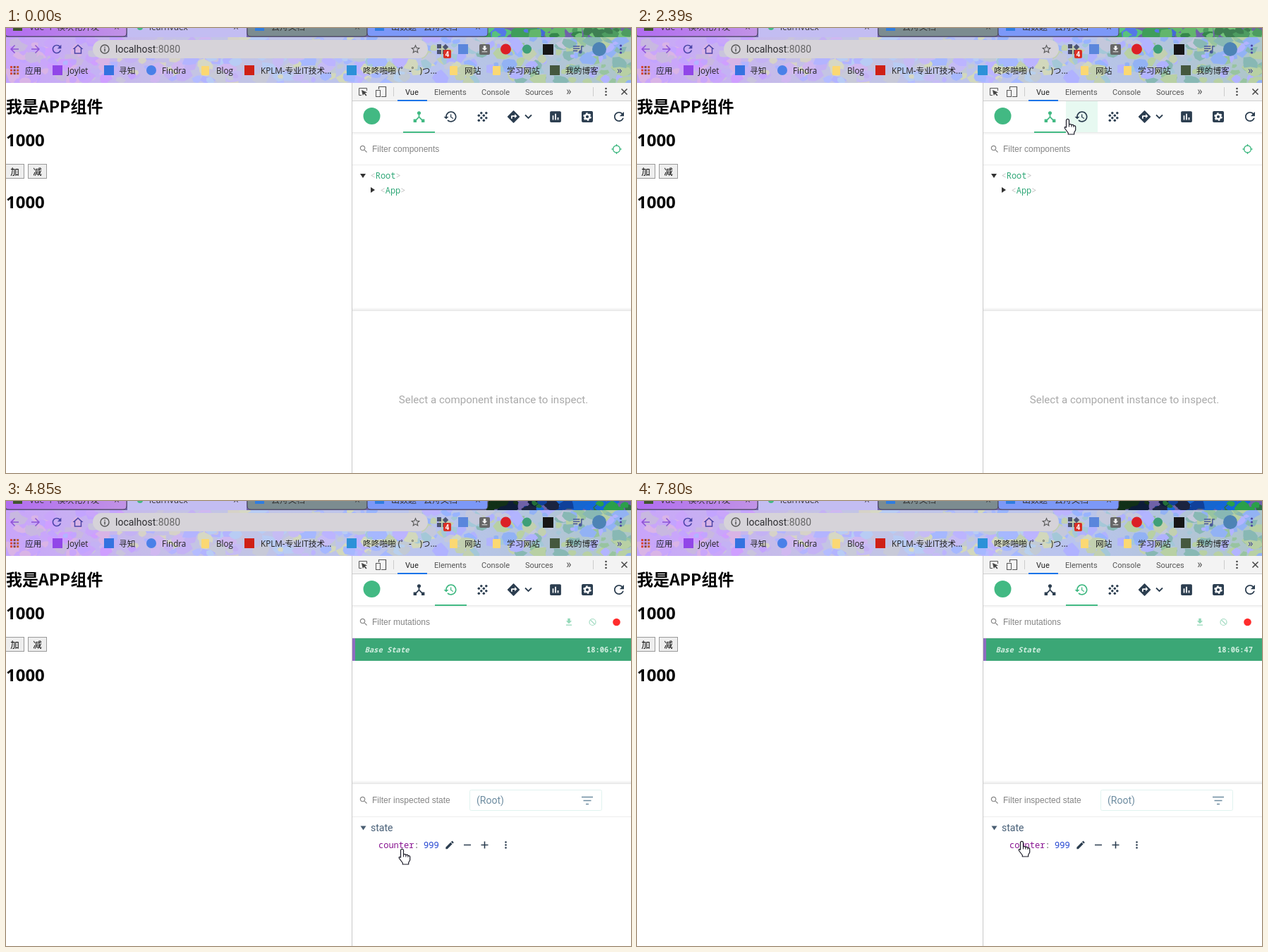
These frames come from a looping animation (886 px wide and 632 px high, 8 s). An HTML page:

```html
<!DOCTYPE html>
<html lang="zh">
<head>
<meta charset="utf-8">
<title>Devtools</title>
<style>
html, body { margin: 0; width: 100%; height: 100%; overflow: hidden; background: #fff; }
svg { display: block; }
text { white-space: pre; }
</style>
</head>
<body>
<svg id="stage" width="886" height="632" viewBox="0 0 886 632"></svg>
<script>
const ROBOTO = 'Roboto, sans-serif', ARIAL = 'Liberation Sans, sans-serif';
const MONO = 'Noto Sans Mono, monospace', UI = 'Open Sans, Noto Sans CJK SC, Noto Sans CJK, sans-serif';
const CJK = 'Noto Sans CJK SC, Noto Sans CJK, sans-serif';
const DARK = '#2c3e50', GREEN = '#42b983';

const text = (x, y, s, size, fill, font, extra = '') =>
  `<text x="${x}" y="${y}" font-size="${size}" fill="${fill}" font-family="${font}" ${extra}>${s}</text>`;
const rect = (x, y, w, h, fill, extra = '') =>
  `<rect x="${x}" y="${y}" width="${w}" height="${h}" fill="${fill}" ${extra}/>`;
const dot = (x, y, r, fill, extra = '') => `<circle cx="${x}" cy="${y}" r="${r}" fill="${fill}" ${extra}/>`;
const shape = (d, fill, extra = '') => `<path d="${d}" fill="${fill}" ${extra}/>`;
const line = (d, color, width = 1) => shape(d, 'none', `stroke="${color}" stroke-width="${width}"`);
const icon = (cx, cy, size, d, fill = DARK, extra = '') =>
  shape(d, fill, `fill-rule="evenodd" transform="translate(${cx - size / 2} ${cy - size / 2}) scale(${size / 24})" ${extra}`);
const dots = (x, y, gap, r, fill) => [-1, 0, 1].map(i => dot(x, y + i * gap, r, fill)).join('');
const group = (id, content) => `<g id="${id}">${content}</g>`;

const ICON = {
  back: 'M20 11H7.83l5.59-5.59L12 4l-8 8 8 8 1.41-1.41L7.83 13H20v-2z',
  forward: 'M4 11h12.17l-5.59-5.59L12 4l8 8-8 8-1.41-1.41L16.17 13H4v-2z',
  refresh: 'M17.65 6.35C16.2 4.9 14.21 4 12 4c-4.42 0-8 3.58-8 8s3.58 8 8 8c3.73 0 6.84-2.55 7.73-6h-2.08c-.82 2.33-3.04 4-5.65 4-3.31 0-6-2.69-6-6s2.69-6 6-6c1.66 0 3.14.69 4.22 1.78L13 11h7V4l-2.35 2.35z',
  home: 'M12 3L2 12h3v9h14v-9h3zM12 5.7l5 4.5V19H7v-8.8z',
  star: 'M22 9.24l-7.19-.62L12 2 9.19 8.63 2 9.24l5.46 4.73L5.82 21 12 17.27 18.18 21l-1.63-7.03zM12 15.4l-3.76 2.27 1-4.28-3.32-2.88 4.38-.38L12 6.1l1.71 4.04 4.38.38-3.32 2.88 1 4.28z',
  queue: 'M15 6H3v2h12V6zm0 4H3v2h12v-2zM3 16h8v-2H3v2zM17 6v8.18c-.31-.11-.65-.18-1-.18-1.66 0-3 1.34-3 3s1.34 3 3 3 3-1.34 3-3V8h3V6h-5z',
  tree: 'M17 16l-4-4V8.82C14.16 8.4 15 7.3 15 6c0-1.66-1.34-3-3-3S9 4.34 9 6c0 1.3.84 2.4 2 2.82V12l-4 4H3v5h5v-3.05l4-4.2 4 4.2V21h5v-5h-4z',
  history: 'M13 3c-4.97 0-9 4.03-9 9H1l3.89 3.89.07.14L9 12H6c0-3.87 3.13-7 7-7s7 3.13 7 7-3.13 7-7 7c-1.93 0-3.68-.79-4.94-2.06l-1.42 1.42C8.27 19.99 10.51 21 13 21c4.97 0 9-4.03 9-9s-4.03-9-9-9zm-1 5v5l4.28 2.54.72-1.21-3.5-2.08V8H12z',
  route: 'M21.71 11.29l-9-9c-.39-.39-1.02-.39-1.41 0l-9 9c-.39.39-.39 1.02 0 1.41l9 9c.39.39 1.02.39 1.41 0l9-9c.39-.38.39-1.01 0-1.41zM14 14.5V12h-4v3H8v-4c0-.55.45-1 1-1h5V7.5l3.5 3.5-3.5 3.5z',
  chart: 'M19 3H5c-1.1 0-2 .9-2 2v14c0 1.1.9 2 2 2h14c1.1 0 2-.9 2-2V5c0-1.1-.9-2-2-2zM9 17H7v-7h2v7zm4 0h-2V7h2v10zm4 0h-2v-4h2v4z',
  search: 'M15.5 14h-.79l-.28-.27C15.41 12.59 16 11.11 16 9.5 16 5.91 13.09 3 9.5 3S3 5.91 3 9.5 5.91 16 9.5 16c1.61 0 3.09-.59 4.23-1.57l.27.28v.79l5 4.99L20.49 19l-4.99-5zm-6 0C7.01 14 5 11.99 5 9.5S7.01 5 9.5 5 14 7.01 14 9.5 11.99 14 9.5 14z',
  download: 'M19 9h-4V3H9v6H5l7 7 7-7zM5 18v2h14v-2H5z',
  edit: 'M3 17.25V21h3.75L17.81 9.94l-3.75-3.75L3 17.25zM20.71 7.04c.39-.39.39-1.02 0-1.41l-2.34-2.34c-.39-.39-1.02-.39-1.41 0l-1.83 1.83 3.75 3.75 1.83-1.83z'
};

let seed = 11;
const rnd = () => (seed = seed * 16807 % 2147483647) / 2147483647;

// Soft camouflage: random blobs whose palette follows x.
function camo(x0, x1, y0, y1, count, size, palettes) {
  let out = '';
  for (let i = 0; i < count; i++) {
    const x = x0 + rnd() * (x1 - x0), y = y0 + rnd() * (y1 - y0);
    const zone = Math.min(palettes.length - 1, Math.floor(((x - x0) / (x1 - x0) + (rnd() - .5) * .2) * palettes.length));
    const colors = palettes[Math.max(0, zone)].split(' ');
    const r = size * (.4 + rnd());
    const pts = Array.from({ length: 8 }, (_, k) => {
      const d = r * (.55 + rnd() * .6), a = k * Math.PI / 4;
      return (x + d * 1.3 * Math.cos(a)).toFixed(1) + ',' + (y + d * Math.sin(a)).toFixed(1);
    });
    out += `<polygon points="${pts.join(' ')}" fill="${colors[Math.floor(rnd() * colors.length)]}"/>`;
  }
  return out;
}

function tab(x, w, fill, mark, title) {
  return shape(`M${x} -2V7q0 5 5 5H${x + w - 5}q5 0 5-5V-2z`, fill, 'stroke="#4a4658"') +
    rect(x + 11, -8, 13, 12, mark) + text(x + 34, 3, title, 12, '#333', UI) +
    text(x + w - 18, 4, '×', 14, '#444', UI);
}

function browser() {
  let s = `<clipPath id="strip"><rect width="886" height="13"/></clipPath>
    <clipPath id="bar"><rect y="13" width="886" height="65"/></clipPath>
    <linearGradient id="tint"><stop stop-color="#c9a4fa"/><stop offset=".3" stop-color="#c4c4e4"/>
    <stop offset=".7" stop-color="#b9c4ee"/><stop offset="1" stop-color="#adc6c8"/></linearGradient>
    <linearGradient id="violet"><stop stop-color="#b16cf0"/><stop offset="1" stop-color="#c193e6"/></linearGradient>`;
  s += '<g clip-path="url(#strip)">' + rect(0, 0, 886, 13, '#6f62a8') +
    group('skyA', camo(680, 886, 0, 12, 45, 8, ['#3f9e5a #5577e8 #59c27c', '#4468d8 #62b66c #35864c', '#4d9c60 #3e7f52 #72c27a'])) +
    group('skyB', camo(680, 886, 0, 12, 45, 8, ['#123018 #0d1c38 #236e38', '#1666d0 #10409a #1b2440', '#2ba04a #1566d8 #2b7244'])) +
    tab(-1, 172, 'url(#violet)', '#40552f', 'Vue 个 模块化开发') +
    rect(172, 0, 169, 13, '#c3bdf2') + dot(190, -1, 4, GREEN) + text(203, 3, 'learnvuex', 12, '#333', UI) +
    text(322, 4, '×', 14, '#444', UI) +
    tab(342, 170, '#7c8c90', '#2f7de0', '云舟文档') +
    tab(512, 171, '#7c98f8', '#2f7de0', '出数题 - 云舟文档') + '</g>';
  s += '<g clip-path="url(#bar)">' + rect(0, 13, 886, 65, 'url(#tint)') +
    camo(0, 886, 13, 78, 420, 8, [
      '#cf9fff #c9a6fa #d9b4e6 #c3a4ff #c8b8e0', '#c4b2f4 #b3b4ff #d6d2c8 #c9c4dc #d0b8f0',
      '#b4bcff #d6d8c4 #c8cad8 #b8ccf4 #c6bcf4', '#a6b8ff #d2d8bc #c2cad4 #b8d0ee #bcb4ff',
      '#98b4ff #c2d0b0 #b0b2ff #a4c8d8 #c4c8dc', '#92b2f4 #98c4a0 #b2b4ff #b8d0a4 #88b8b4']) + '</g>';

  s += rect(123, 17, 475, 26, '#d6d3d9', 'rx="13"');
  s += icon(12, 30, 18, ICON.back, '#8d55d4') + icon(42, 30, 18, ICON.forward, '#8d55d4') +
    icon(72, 30, 19, ICON.refresh, '#4a45a8') + icon(102, 30, 18, ICON.home, '#4a45a8');
  s += dot(140, 30, 6, 'none', 'stroke="#555" stroke-width="1.4"') + rect(139.3, 29, 1.5, 4.5, '#555') + rect(139.3, 26.5, 1.5, 1.5, '#555');
  s += text(155, 35, 'localhost<tspan fill="#666">:8080</tspan>', 14, '#2f2f33', ROBOTO) + icon(580.5, 30, 16, ICON.star, '#555');

  s += [[611, 23], [611, 31], [619, 31]].map(p => rect(...p, 6, 6, '#4d5570')).join('') +
    rect(620, 24, 6, 6, '#4d5570', 'transform="rotate(45 623 27)"') +
    rect(620, 31, 11, 12, '#d93025', 'rx="2"') + text(622.5, 41, '4', 10, '#fff', ROBOTO, 'font-weight="bold"');
  s += rect(641, 23, 14, 14, '#5a86dc') + rect(671, 23, 15, 15, '#666', 'rx="2"') + icon(678.5, 30, 13, ICON.download, '#eee') +
    dot(708.5, 30, 7.5, '#dc1f25') + dot(738.5, 30, 6.5, '#3f9f78') + rect(761, 23, 15, 15, '#161616') +
    icon(811, 30, 19, ICON.queue, '#4a5a9a') + dot(841, 30, 10, '#4d83b5') + dots(871.5, 30, 5, 1.6, '#4a45a0');

  for (let i = 0; i < 9; i++) s += rect(6 + i % 3 * 4.6, 54 + Math.floor(i / 3) * 4.6, 3, 3, ['#d9453a', '#8a4a3a', '#c05a2c'][i % 3]);
  const marks = [[66, '#9146e8'], [139, '#3472e0'], [338, '#cf2016'], [483, '#2b91d8'], [771, '#45583e']];
  s += marks.map(([x, c]) => rect(x, 53, 14, 14, c)).join('') + dot(206, 60, 7, '#4a80e8');
  s += [277, 629, 690].map(x => rect(x, 54, 11, 13, '#fbd873', 'rx="1"')).join('');
  const labels = [[27, '应用'], [87, 'Joylet'], [160, '寻知'], [221, 'Findra'], [298, 'Blog'], [361, 'KPLM-专业IT技术...'],
    [506, '咚咚啪啪 (゜-゜)つ...'], [650, '网站'], [710, '学习网站'], [793, '我的博客']];
  s += labels.map(([x, l]) => text(x, 65, l, 11.7, '#222', UI)).join('') + text(866, 65, '»', 15, '#3f3f90', UI);
  return s;
}

function page() {
  const button = (x, w, label) => rect(x + .5, 193.5, w, 20, '#eee', 'stroke="#999"') + text(x + w / 2 + .5, 208.5, label, 12.5, '#000', CJK, 'text-anchor="middle"');
  const total = y => text(0, y, '1000', 24, '#000', 'Open Sans, sans-serif', 'font-weight="bold"');
  return rect(0, 78, 490, 554, '#fff') + text(0, 120, '我是APP组件', 23, '#000', CJK, 'font-weight="bold"') +
    total(168) + total(256) + button(-1, 26, '加') + button(31, 26, '减');
}

function panel() {
  let s = rect(490, 78, 396, 554, '#fff') + rect(490, 78, 1, 554, '#c8c8c8') + rect(491, 78, 395, 25, '#f3f3f3') + rect(491, 103, 395, 1, '#d0d0d0');
  s += line('M504 95.5H500.5V85.5H511.5V89', '#555') + shape('M504 88l8 3.5-3.2 1 2.7 3-1.3 1-2.6-3-1.8 2.5z', '#444') +
    line('M528.5 87V83.5H538.5V97.5H532', '#555', 1.2) + rect(524.5, 88.5, 6, 9, '#f3f3f3', 'stroke="#555"') +
    rect(549, 84, 1, 13, '#ccc') + rect(832, 84, 1, 13, '#ccc');
  s += [[566, 'Vue', '#222'], [607, 'Elements', '#555'], [674, 'Console', '#555'], [736, 'Sources', '#555']]
    .map(([x, l, c]) => text(x, 95, l, 11, c, ROBOTO)).join('') + text(794, 95, '»', 16, '#555', ROBOTO);
  s += rect(555, 102, 42, 2, '#1a73e8') + dots(850.5, 90.5, 4.5, 1.3, '#444') + line('M872.5 86.5l8 8m0-8l-8 8', '#444', 1.5);

  s += rect(491, 148, 395, 1, '#e9e9e9') + rect(491, 149, 395, 2, '#f6f6f6') + dot(518.5, 125, 12, GREEN);
  s += `<rect id="hover" y="104" width="45" height="44" fill="#e7f9f1"/><rect id="underline" y="147" width="45" height="2" fill="${GREEN}"/>`;
  s += icon(585.5, 126, 21, ICON.tree, DARK, 'id="tab0"') + icon(630, 126, 20.5, ICON.history, DARK, 'id="tab1"');
  for (let i = 0; i < 16; i++) if ((i + (i >> 2)) % 2) s += dot(670.3 + i % 4 * 3.5, 120.8 + (i >> 2) * 3.5, 1.75, DARK);
  s += icon(719.5, 126, 21, ICON.route) + line('M736 123.5l4.5 4.5 4.5-4.5', DARK, 1.8) + icon(779, 126, 21, ICON.chart) +
    rect(816, 118, 16, 16, DARK, 'rx="2"') + dot(824, 126, 3.3, 'none', 'stroke="#fff" stroke-width="2.4"') +
    dot(824, 126, 5, 'none', 'stroke="#fff" stroke-width="1.6" stroke-dasharray="2.6 2.636"') + icon(869, 126, 21, ICON.refresh);
  s += icon(507, 172, 14, ICON.search, '#888') + rect(491, 194, 395, 1, '#ececec');
  s += `<linearGradient id="shade" x2="0" y2="1"><stop stop-color="#fff"/><stop offset="1" stop-color="#e6e6e6"/></linearGradient>`;
  return s + rect(491, 397, 395, 5, 'url(#shade)');
}

function components() {
  const tag = (x, y, name) => text(x, y, `&lt;<tspan fill="#2fa777">${name}</tspan>&gt;`, 12, '#c4c4c4', MONO);
  return text(519, 176, 'Filter components', 12, '#858585', ARIAL) +
    dot(865.5, 172, 5, 'none', `stroke="${GREEN}" stroke-width="1.3"`) +
    line('M865.5 165v3m0 8v3M858.5 172h3m8 0h3', GREEN, 1.3) +
    shape('M502 207h8l-4 6z', '#333') + tag(516.5, 214, 'Root') + shape('M517 226v8l6-4z', '#333') + tag(530.5, 235, 'App') +
    text(691, 533, 'Select a component instance to inspect.', 15.1, '#a9a9a9', ROBOTO, 'text-anchor="middle"');
}

function store() {
  const bold = 'font-weight="bold"';
  return text(519, 176, 'Filter mutations', 12, '#858585', ARIAL) + icon(798, 172, 14, ICON.download, '#93d8b8') +
    dot(831.5, 172, 4.5, 'none', 'stroke="#a5dcc3" stroke-width="1.2"') + line('M828.5 169l6 6', '#a5dcc3', 1.2) + dot(865.5, 172, 5.3, '#ff2c2c') +
    rect(491, 195, 395, 32, '#3ba776') + rect(491, 195, 4, 32, '#8e6cc0') +
    text(508.5, 215, 'Base State', 10.5, '#d3efe1', MONO, bold + ' font-style="italic"') +
    icon(593, 211, 14, ICON.history, '#d3efe1', 'id="travel"') + text(823, 215, '18:06:47', 10.4, '#d3efe1', MONO, bold) +
    icon(507, 425, 14, ICON.search, '#888') + text(519, 429, 'Filter inspected state', 12, '#858585', ARIAL) +
    rect(657.5, 410.5, 187, 29, '#fff', 'stroke="#e0f3ef" rx="2"') + text(667, 430, '(Root)', 14, '#6d8ca0', ROBOTO) +
    line('M816 420.5h16M818.5 425.5h11M822 430.5h4', '#6d8ca0', 1.6) + rect(491, 448, 395, 1, '#ececec') +
    shape('M502.5 461.5h8l-4 6z', '#4a5e72') + text(517, 469, 'state', 14, '#486078', ROBOTO) +
    text(528, 493, 'counter<tspan fill="#666">:</tspan>', 12, '#881391', MONO) + text(592, 493, '999', 12, '#1c3fcf', MONO) +
    group('tools', icon(629, 488.5, 15, ICON.edit) + line('M649 488.5h10M673.5 488.5h10M678.5 483.5v10', DARK, 1.6) + dots(708.5, 488.5, 4, 1.3, DARK));
}

const hand = shape('M-2.5 2.3a2 2 0 0 1 4 0V8q2.7-1.2 3.4.7 2.3-1 3 .9 2.8-.3 2.8 2V16l-2 3.5V22H.3V20L-4.6 13.5q-1-3 2.1-1.3z', '#fff', 'stroke="#1b1b28" stroke-width="1.2" stroke-linejoin="round"') +
  line('M1.5 8v3.5M4.9 8.7v3M7.9 9.6v2.4', '#1b1b28');
const arrow = shape('M.5.5v16l3.7-3.5 2.4 5.5 2.4-1-2.4-5.5h5z', '#fff', 'stroke="#000"');

const $ = id => document.getElementById(id);
$('stage').innerHTML = browser() + page() + panel() + group('components', components()) + group('store', store()) +
  group('cursor', group('hand', hand) + group('arrow', arrow));

// Pointer moves: start, end, number of steps, path.
const moves = [
  [210, 980, 11, [[91, 548], [310, 470], [540, 340], [656, 230], [610, 165], [534, 141]]],
  [1060, 1060, 1, [[602, 138]]],
  [1210, 1910, 10, [[606, 138], [618, 129], [622, 126], [613, 128], [608, 130]]],
  [2390, 2390, 1, [[611, 129]]],
  [2770, 3080, 5, [[611, 129], [612, 131]]],
  [3610, 3850, 4, [[610, 140], [582, 176], [545, 227]]],
  [3930, 4390, 7, [[540, 260], [548, 350], [575, 481]]],
  [4620, 4850, 4, [[573, 485], [562, 494]]],
  [5100, 5480, 6, [[557, 494], [535, 490], [509, 480]]],
  [5710, 6100, 6, [[503, 470], [497, 458], [518, 472], [537, 491]]],
  [7490, 7490, 1, [[538, 491]]],
  [7640, 7800, 3, [[540, 488], [546, 483]]]
];

function pointer(t) {
  const move = moves.filter(m => t >= m[0]).pop();
  if (!move) return null;
  const [start, end, steps, path] = move;
  if (steps == 1) return path[0];
  const step = Math.min(steps - 1, Math.floor((t - start) / (end - start) * (steps - 1) + .001));
  const u = step / (steps - 1) * (path.length - 1), i = Math.min(path.length - 2, Math.floor(u));
  return path[i].map((v, k) => Math.round(v + (path[i + 1][k] - v) * (u - i)));
}

const show = (id, on) => $(id).style.display = on ? '' : 'none';

function draw(t) {
  const inStore = t >= 2850, active = inStore ? 1 : 0;
  const pos = pointer(t), [x, y] = pos || [-99, -99];
  const hovered = y >= 104 && y < 149 && x >= 563 && x < 653 ? Math.floor((x - 563) / 45) : -1;
  const onEntry = inStore && y >= 195 && y < 228;
  const onCounter = inStore && x >= 516 && y >= 479 && y < 500;
  const onHand = hovered >= 0 || onEntry || onCounter || inStore && y >= 454 && y < 479;

  show('skyA', !inStore);
  show('skyB', inStore);
  show('components', !inStore);
  show('store', inStore);
  show('travel', onEntry);
  show('tools', onCounter);
  show('hover', hovered >= 0);
  $('hover').setAttribute('x', 563 + 45 * hovered);
  $('underline').setAttribute('x', 563 + 45 * active);
  [0, 1].forEach(i => $('tab' + i).setAttribute('fill', i == active ? GREEN : DARK));
  show('cursor', pos);
  show('hand', onHand);
  show('arrow', !onHand);
  $('cursor').setAttribute('transform', `translate(${x} ${y})`);
}

const begin = performance.now();
(function loop() {
  draw((performance.now() - begin) % 8000);
  requestAnimationFrame(loop);
})();
</script>
</body>
</html>
```
